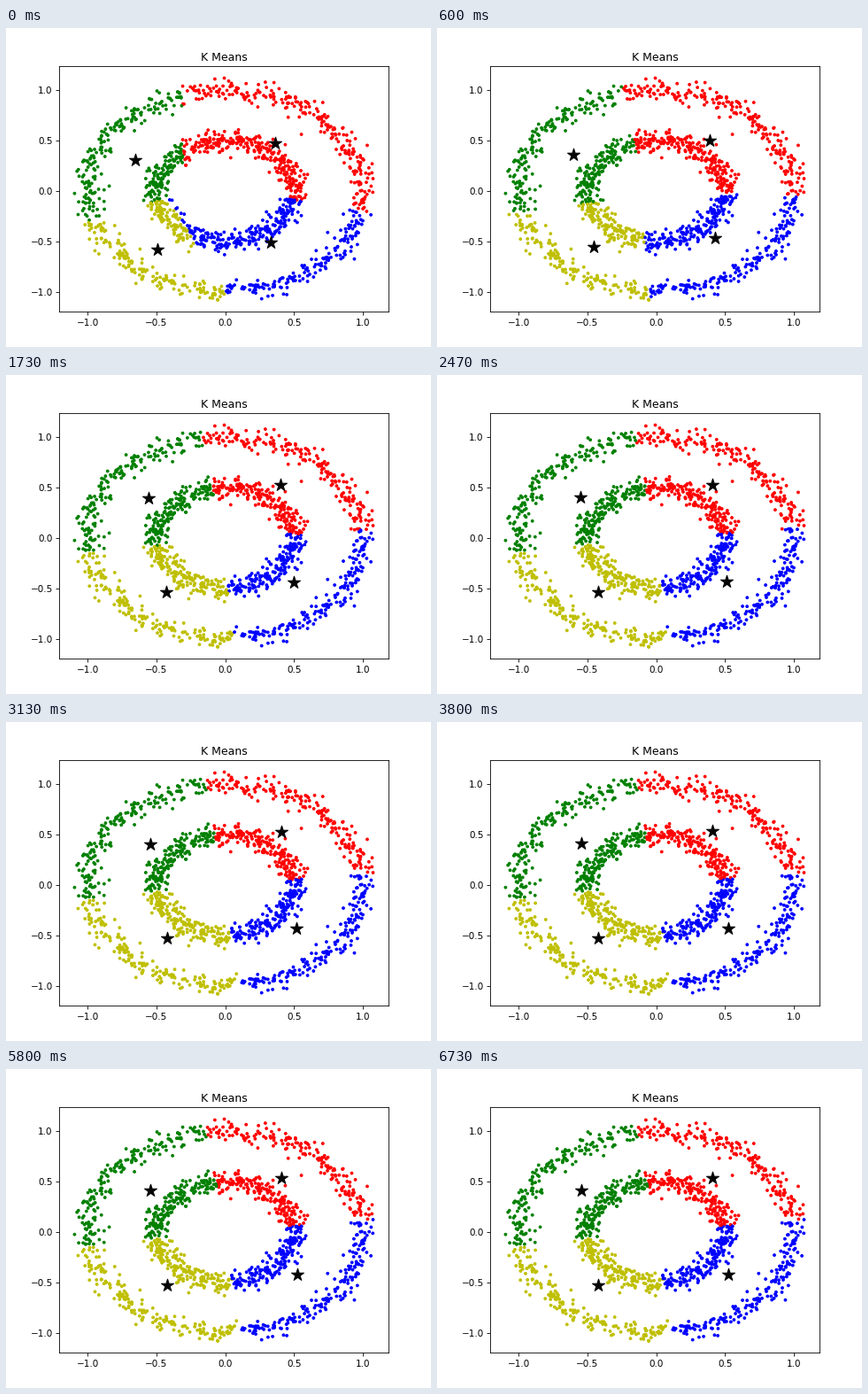
Write a matplotlib script that moves like this. It is 480 px wide and 360 px high and loops after 7470 ms.

```python
import numpy as np
import matplotlib.pyplot as plt
from matplotlib.animation import FuncAnimation
from matplotlib.colors import to_rgba_array

FRAMES = 112
LOOP_MS = 7470
FRAMES_PER_STEP = 8
DECAY = 0.5  # share of the remaining distance left after each step
COLORS = to_rgba_array(["r", "g", "b", "y"])

# Cluster centres in the order red, green, blue, yellow
SEEDS = np.array([(0.40, 0.35), (-1.02, 0.35), (0.206, -0.426), (-0.561, -0.78)])
FIRST = np.array([(0.363, 0.467), (-0.656, 0.308), (0.334, -0.514), (-0.491, -0.578)])
LAST = np.array([(0.411, 0.530), (-0.543, 0.407), (0.523, -0.428), (-0.420, -0.532)])


def make_rings(n=1500, factor=0.5, noise=0.05):
    """Two noisy concentric circles with evenly spaced angles."""
    rng = np.random.RandomState(0)
    angle = np.linspace(0, 2 * np.pi, n // 2, endpoint=False)
    ring = np.column_stack([np.cos(angle), np.sin(angle)])
    pts = np.vstack([ring, factor * ring])
    order = np.arange(n)
    rng.shuffle(order)
    return pts[order] + rng.normal(scale=noise, size=pts.shape)


def centres_at(step):
    """Centres close in on their resting places; the seeds come before step 0."""
    if step < 0:
        return SEEDS
    return LAST + (FIRST - LAST) * DECAY ** step


def nearest(pts, centres):
    return np.linalg.norm(pts[:, None] - centres, axis=2).argmin(axis=1)


points = make_rings()

fig, ax = plt.subplots(figsize=(6.4, 4.8), dpi=75)
ax.set_title("K Means")
ax.set(xlim=(-1.207, 1.187), ylim=(-1.2, 1.233))
ax.set_xticks(np.arange(-1, 1.1, 0.5))
ax.set_yticks(np.arange(-1, 1.1, 0.5))

dots = ax.scatter(*points.T, s=7, c="r")
stars = ax.scatter(*FIRST.T, s=200, marker="*", c="#050505", zorder=3)


def update(frame):
    step = frame // FRAMES_PER_STEP
    # Dots keep the colouring from which the shown centres were computed
    dots.set_color(COLORS[nearest(points, centres_at(step - 1))])
    stars.set_offsets(centres_at(step))
    return dots, stars


anim = FuncAnimation(fig, update, frames=FRAMES, interval=LOOP_MS / FRAMES,
                     repeat=True, repeat_delay=0, blit=False)
plt.show()
```
